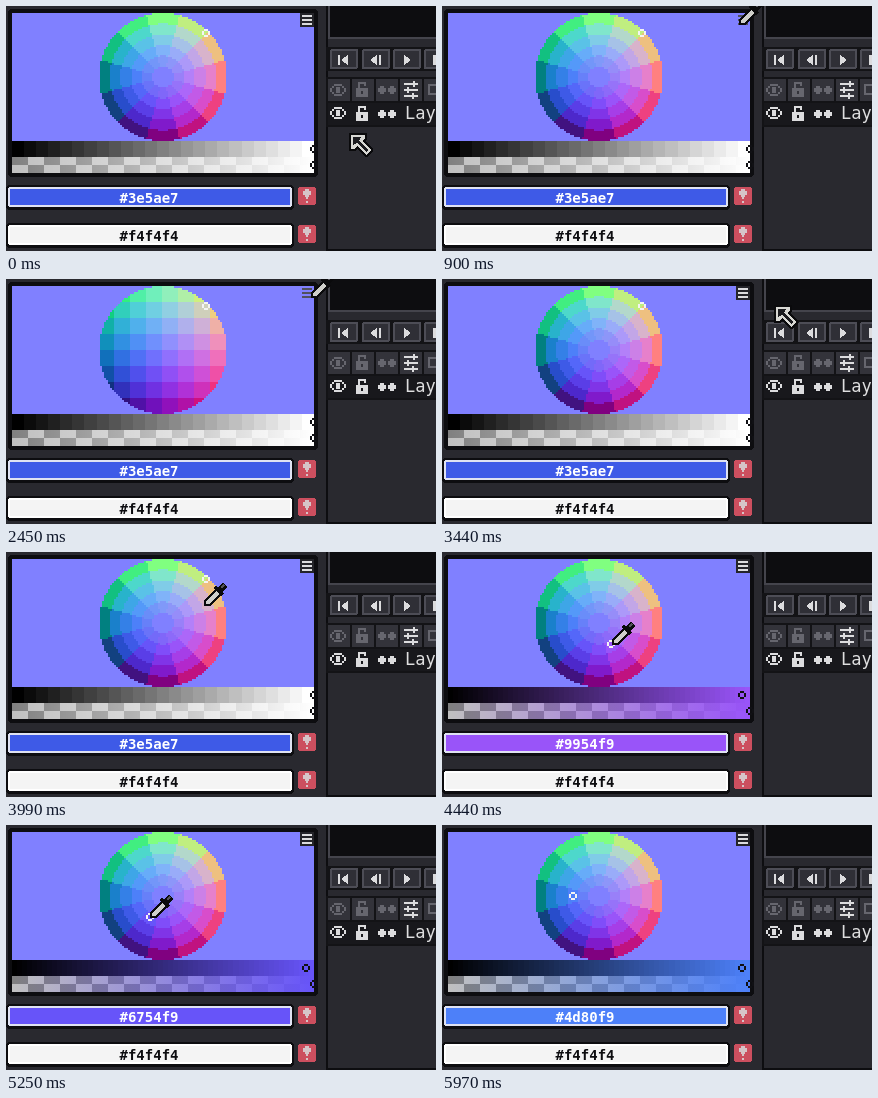
These frames come from a looping animation (430 by 245 pixels, 6060 ms). An HTML page with a canvas:

```html
<!DOCTYPE html>
<html lang="en">
<head>
<meta charset="utf-8">
<title>Colour wheel</title>
<style>
  html, body { margin: 0; width: 100%; height: 100%; overflow: hidden; background: #29292f; }
  canvas { position: absolute; left: 6px; top: 7px; }
  svg { position: absolute; left: 0; top: 0; shape-rendering: crispEdges; }
  text { font-family: "DejaVu Sans Mono", monospace; }
  .hex { font-size: 14px; font-weight: bold; text-anchor: middle; }
  .label { font-size: 17px; fill: #dededf; }
  .btn { fill: #2f2f36; stroke: #4d4d56; stroke-width: 2; }
  .lit { color: #dcdcde; }
  .dim { color: #66666e; }
</style>
</head>
<body>
<canvas id="area" width="302" height="160"></canvas>
<svg width="430" height="245" viewBox="0 0 430 245">
  <defs>
    <g id="eye">
      <path d="M0 6H2V4H4V2H12V4H14V6H16V10H14V12H12V14H4V12H2V10H0ZM4 4V6H2V10H4V12H12V10H14V6H12V4Z" fill="currentColor" fill-rule="evenodd"/>
      <path d="M6 5H10V11H6Z" fill="currentColor"/>
    </g>
    <g id="lock" fill="currentColor">
      <path d="M0 7H12V16H0ZM5 10V13H7V10Z" fill-rule="evenodd"/>
      <path d="M3 7V2H9V5" fill="none" stroke="currentColor" stroke-width="2"/>
    </g>
    <path id="dots" fill="currentColor" d="M2 0H6V2H8V6H6V8H2V6H0V2H2ZM12 0H16V2H18V6H16V8H12V6H10V2H12Z"/>
    <path id="ring" fill-rule="evenodd" d="M-2 -4H2V-2H4V2H2V4H-2V2H-4V-2H-2ZM-2 -2V2H2V-2Z"/>
    <g id="warn">
      <rect x="1" y="1" width="18" height="18" rx="3" fill="#cc4f5f"/>
      <path d="M8 3H12V5H14V9H12V11H11V13H9V11H8V9H6V5H8ZM9 15H11V17H9Z" fill="#d6c4c8"/>
    </g>
    <g id="arrow" transform="scale(2)">
      <path d="M0 0H9V3L8 4L12 8V9L9 12H8L4 8L3 9H0Z" fill="#0a0a0c"/>
      <path d="M1 1H8V2.5L6.5 4L11 8.5L8.5 11L4 6.5L2.5 8H1Z" fill="#d8d8d4"/>
      <path d="M2 2H6L5 4L9.5 8.5L8.5 9.5L4 5L2 6Z" fill="#1c1c20"/>
    </g>
    <g id="dropper" transform="scale(2) translate(0 -12)" fill="none">
      <path d="M0 12V9L6 3L9 6L3 12Z" fill="#0a0a0c"/>
      <path d="M1 11V9.5L6 4.5L7.5 6L2.5 11Z" fill="#cfcfcb"/>
      <path d="M5.5 2.5L9.5 6.5" stroke="#0a0a0c" stroke-width="1.6"/>
      <path d="M7.5 4.5L10.6 1.4" stroke="#0a0a0c" stroke-width="3"/>
      <path d="M8.5 3L10 1.5" stroke="#55555c" stroke-width=".8"/>
    </g>
  </defs>

  <!-- colour box -->
  <rect x="4" y="5" width="306" height="164" rx="2" fill="none" stroke="#0d0d10" stroke-width="4"/>
  <g id="button">
    <rect id="buttonBox" x="294" y="7" width="14" height="14" fill="#242429"/>
    <path id="bars" d="M296 10H306M296 14H306M296 18H306" stroke-width="2"/>
  </g>
  <use id="mark" href="#ring" fill="#f4f4f4"/>
  <use id="valueMark" href="#ring" y="143" fill="#101014"/>
  <use href="#ring" x="308" y="159" fill="#101014"/>

  <!-- colour fields -->
  <rect x="0" y="179" width="288" height="25" rx="4" fill="#0d0d10"/>
  <rect id="pill" x="3" y="182" width="282" height="18" rx="2" stroke="#dfe2f2" stroke-width="2"/>
  <text id="hex" class="hex" x="143" y="197" fill="#fff"></text>
  <rect x="0" y="217" width="288" height="25" rx="4" fill="#0d0d10"/>
  <rect x="3" y="220" width="282" height="18" rx="2" fill="#f4f4f4" stroke="#fff" stroke-width="2"/>
  <text class="hex" x="143" y="235" fill="#0d0d10">#f4f4f4</text>
  <use href="#warn" x="291" y="180"/>
  <use href="#warn" x="291" y="218"/>

  <!-- timeline panel -->
  <path d="M320 0H322V245H320ZM322 243H430V245H322Z" fill="#0d0d10"/>
  <rect x="324" y="0" width="106" height="31" fill="#0d0d10"/>
  <path d="M323 0V32H430" fill="none" stroke="#44444c" stroke-width="2"/>
  <rect x="320" y="41" width="110" height="24" fill="#131316"/>
  <g class="btn">
    <rect x="325" y="44" width="26" height="18" rx="1"/>
    <rect x="357" y="44" width="26" height="18" rx="1"/>
    <rect x="388" y="44" width="26" height="18" rx="1"/>
    <rect x="419" y="44" width="26" height="18" rx="1"/>
  </g>
  <path fill="#dcdcde" d="M332 49H334V59H332ZM342 49V59L336 55V53ZM371 49V59L365 55V53ZM373 49H375V59H373ZM398 49V59L404 55V53ZM427 49H430V59H427Z"/>
  <rect x="320" y="71" width="110" height="50" fill="#131316"/>
  <path fill="#33333a" d="M322 73H344V95H322ZM346 73H368V95H346ZM370 73H392V95H370ZM394 73H416V95H394ZM418 73H430V95H418Z"/>
  <rect x="322" y="97" width="108" height="22" fill="#18181c"/>
  <g class="dim">
    <use href="#eye" x="324" y="76"/><use href="#lock" x="350" y="75"/><use href="#dots" x="372" y="80"/>
    <path d="M430 79H423V88H430" fill="none" stroke="currentColor" stroke-width="2"/>
  </g>
  <path d="M398 78H412M398 84H412M398 90H412M408 75V81M402 81V87M407 87V93" stroke="#dcdcde" stroke-width="2"/>
  <g class="lit">
    <use href="#eye" x="324" y="99"/><use href="#lock" x="350" y="99"/><use href="#dots" x="372" y="104"/>
  </g>
  <text class="label" x="399" y="113">Layer 1</text>

  <g id="menu">
    <rect x="294" y="21" width="134" height="20" fill="#0d0d10"/>
    <rect x="296" y="22" width="130" height="17" fill="#3b3a42"/>
    <rect id="hover" x="300" y="23" width="122" height="15" fill="#6a6874"/>
    <path d="M304 30L307 33L312 27" fill="none" stroke="#dededf" stroke-width="2"/>
    <text class="label" x="319" y="36" style="font-size:15px">Discrete</text>
  </g>
  <use id="cursor"/>
</svg>
<script>
const LOOP = 6060;
const $ = id => document.getElementById(id);
const ctx = $('area').getContext('2d');
const rgb = c => `rgb(${c})`;
const within = (t, a, b) => t >= a && t < b;

// The picture is held between ticks: [first tick, count], 90 ms apart
const ticks = [[0, 11], [1180, 1], [1360, 3], [1820, 2], [2090, 9], [2990, 14], [4260, 20]]
  .flatMap(([start, n]) => Array.from({ length: n }, (_, i) => start + i * 90));

// Cursor path: time, x, y, shape
const A = 'arrow', D = 'dropper';
const path = [
  [0, 343, 127, A], [180, 333, 101, A], [450, 309, 34, A], [630, 300, 11, A],
  [720, 299, 15, D], [900, 297, 19, D], [1270, 297, 19, D],
  [1360, 307, 22, A], [1450, 319, 29, A], [1540, 323, 29, A], [1820, 323, 27, A],
  [2000, 323, 27, A], [2360, 309, 20, A], [2450, 305, 19, D], [2630, 297, 19, D], [2900, 297, 19, D],
  [2990, 307, 22, A], [3170, 323, 28, A], [3350, 325, 28, A], [3440, 332, 26, A],
  [3530, 306, 18, A], [3620, 284, 36, D], [4080, 174, 59, D],
  [5430, 138, 73, D], [5520, 163, 88, D], [5610, 207, 116, D], [5700, 258, 149, D],
  [5790, 316, 185, A], [5880, 377, 221, A], [5970, 436, 257, A]
];
// Angle of the picking circle, in degrees
const orbit = [[4080, 50], [4170, 40], [4440, -54.5], [5250, -485.5], [5430, -540]];

function sample(keys, t) {
  let i = keys.length - 1;
  while (i && keys[i][0] > t) i--;
  const a = keys[i], b = keys[i + 1] || a;
  const k = b === a ? 0 : (t - a[0]) / (b[0] - a[0]);
  return a.map((v, j) => typeof v === 'number' ? v + (b[j] - v) * k : v);
}

// Normal-map colour for a snapped angle and distance
function snapped(angle, dist) {
  const step = Math.PI / 10;
  const lift = Math.round(Math.acos(dist) / step) * step;
  return [dist * Math.cos(angle), dist * Math.sin(angle), Math.sin(lift)]
    .map(n => Math.round(128 + 127 * n));
}
const snapAngle = a => Math.round(a / (Math.PI / 6)) * Math.PI / 6;

function discreteColor(u, v) {
  const ring = Math.floor(Math.hypot(u, v) * 6) / 5;
  return snapped(snapAngle(Math.atan2(-v, u)), Math.min(ring, 1));
}
function smoothColor(u, v) {
  const band = n => (Math.floor(n * 4) + .5) / 4;
  const x = band(u), y = band(-v);
  const z = Math.sqrt(Math.max(0, 1 - x * x - y * y));
  return [x, y, z].map(n => Math.round(128 + 127 * n));
}

function makeWheel(color) {
  const c = document.createElement('canvas');
  c.width = 302;
  c.height = 128;
  const g = c.getContext('2d');
  g.fillStyle = '#8080ff';
  g.fillRect(0, 0, 302, 128);
  for (let y = 0; y < 64; y++) for (let x = 0; x < 151; x++) {
    const u = (x - 75) / 32, v = (y - 31.5) / 32;
    if (Math.hypot(u, v) >= 1) continue;
    g.fillStyle = rgb(color(u, v));
    g.fillRect(x * 2, y * 2, 2, 2);
  }
  return c;
}
const wheels = { discrete: makeWheel(discreteColor), smooth: makeWheel(smoothColor) };

function drawBars(color, steps) {
  const w = 302 / steps;
  for (let i = 0; i < steps; i++) {
    const x = Math.round(i * w), next = Math.round((i + 1) * w);
    const k = i / (steps - 1);
    ctx.fillStyle = rgb(color.map(c => Math.round(c * k)));
    ctx.fillRect(x, 128, next - x, 16);
  }
  for (let i = 0; i < 19; i++) for (let j = 0; j < 2; j++) {
    ctx.fillStyle = (i + j) % 2 ? '#c0c0c0' : '#808080';
    ctx.fillRect(i * 16, 144 + j * 8, 16, 8);
  }
  const fade = ctx.createLinearGradient(0, 0, 302, 0);
  fade.addColorStop(0, `rgba(${color},0)`);
  fade.addColorStop(1, rgb(color));
  ctx.fillStyle = fade;
  ctx.fillRect(0, 144, 302, 16);
}

function setAttrs(id, attrs) {
  for (const k in attrs) $(id).setAttribute(k, attrs[k]);
}

function render(t) {
  let [, x, y, shape] = sample(path, t);
  const picked = t >= 4080;
  const angle = sample(orbit, t)[1] * Math.PI / 180;
  if (within(t, 4080, 5430)) {
    x = 157 + 23 * Math.cos(angle);
    y = 75 - 22 * Math.sin(angle);
  }
  setAttrs('cursor', { href: '#' + shape, transform: `translate(${Math.round(x)} ${Math.round(y)})` });

  const menuOpen = within(t, 1180, 1820) || within(t, 2810, 3260);
  $('menu').style.display = menuOpen ? '' : 'none';
  $('hover').style.display = within(t, 1450, 1820) || within(t, 3080, 3260) ? '' : 'none';
  const hot = !menuOpen && (within(t, 720, 1180) || within(t, 2450, 2810));
  $('buttonBox').style.display = hot ? 'none' : '';
  setAttrs('bars', { stroke: hot ? '#50505e' : '#dcdcde' });

  ctx.drawImage(wheels[within(t, 1910, 3350) ? 'smooth' : 'discrete'], 0, 0);
  const snap = snapAngle(angle);
  const color = picked ? snapped(snap, .4) : [62, 90, 231];
  drawBars(picked ? color : [255, 255, 255], picked ? 60 : 25);
  setAttrs('mark', picked
    ? { x: Math.round(156 + 25 * Math.cos(snap)), y: Math.round(71 - 24 * Math.sin(snap)) }
    : { x: 200, y: 27 });
  setAttrs('valueMark', { x: picked ? 5 + Math.round(302 * Math.max(...color) / 255) : 308 });
  setAttrs('pill', { fill: rgb(color) });
  $('hex').textContent = '#' + color.map(c => c.toString(16).padStart(2, '0')).join('');
}

const start = performance.now();
let shown = -1;
function frame() {
  const now = (performance.now() - start) % LOOP;
  const tick = ticks.findLast(t => t <= now) ?? 0;
  if (tick !== shown) render(shown = tick);
  requestAnimationFrame(frame);
}
frame();
</script>
</body>
</html>
```
